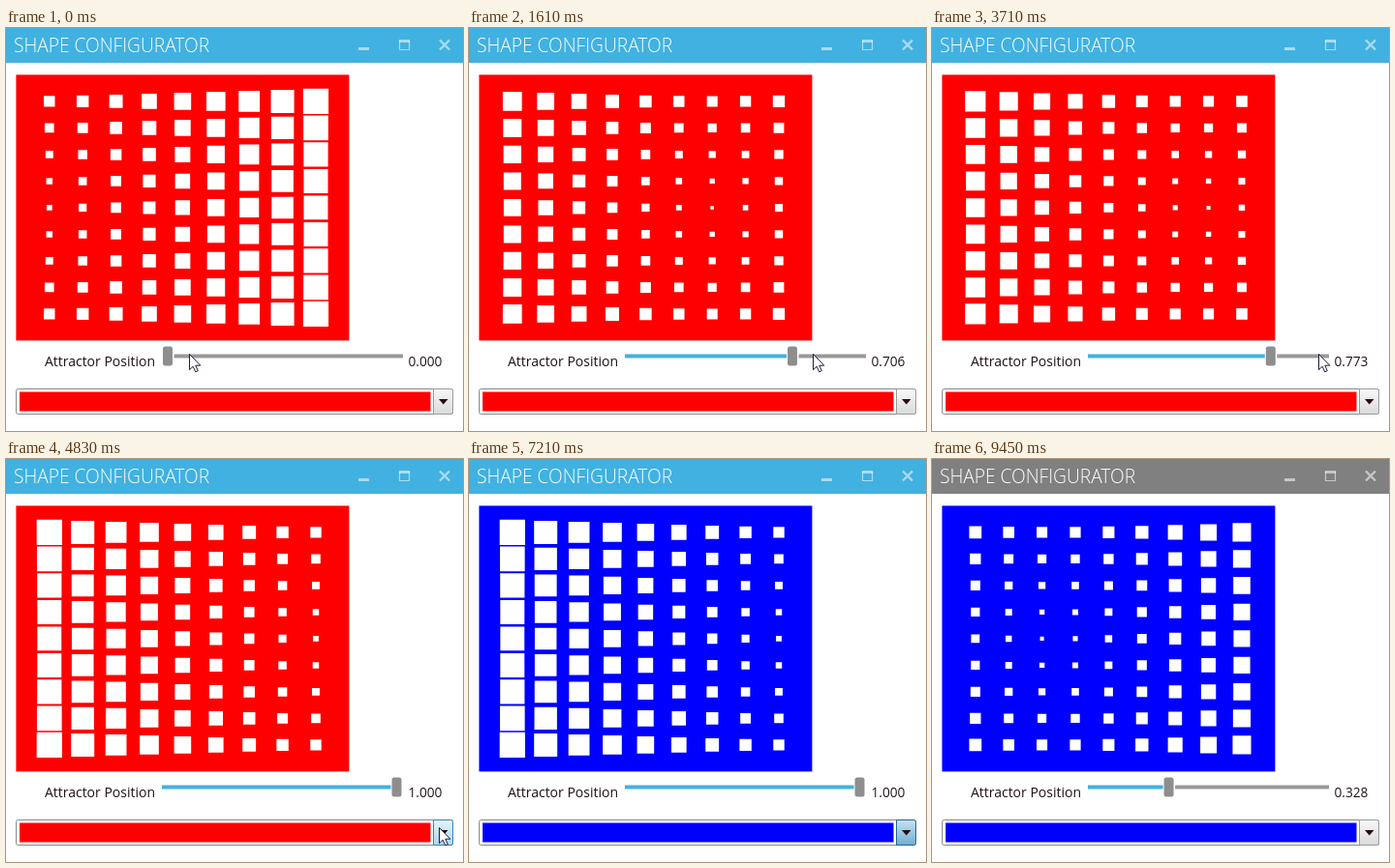
These frames come from a looping animation (472 by 417 pixels, 9.52 s). An HTML page:

```html
<!DOCTYPE html>
<html lang="en">
<head>
<meta charset="utf-8">
<title>Shape configurator</title>
<style>
html, body { margin: 0; width: 100%; height: 100%; overflow: hidden; background: #fff; }
svg { display: block; width: 472px; height: 417px; }
text { font-family: "Open Sans", "Noto Sans", sans-serif; font-size: 14px; fill: #201216; }
#title { font-size: 19.2px; font-weight: 350; fill: #fff; }
#value { font-size: 13.7px; }
#bar { fill: #41b1e1; animation: blur 9520ms step-end infinite; }
@keyframes blur { 99.26% { fill: #808080; } }
</style>
</head>
<body>
<svg viewBox="0 0 472 417">
  <defs>
    <linearGradient id="normal" x2="0" y2="1"><stop stop-color="#f8f8f8"/><stop offset="1" stop-color="#dadada"/></linearGradient>
    <linearGradient id="hover" x2="0" y2="1"><stop stop-color="#e6f4fc"/><stop offset="1" stop-color="#a9d9f2"/></linearGradient>
    <linearGradient id="open" x2="0" y2="1"><stop stop-color="#c4e2f2"/><stop offset="1" stop-color="#70aed3"/></linearGradient>
  </defs>
  <rect id="bar" width="472" height="36"/>
  <text id="title" x="8" y="25">SHAPE CONFIGURATOR</text>
  <g fill="none" stroke="#fff" stroke-opacity=".55">
    <path d="M364 21.5h11" stroke-width="3"/>
    <path d="M406.5 13v9.5h10V13" stroke-width="1.2"/>
    <path d="M406 13.5h11" stroke-width="3"/>
    <path d="M448 12.5l10 10m0-10l-10 10" stroke-width="2.4"/>
  </g>
  <rect id="panel" x="10.4" y="48.4" width="344" height="275"/>
  <path id="cells" fill="#fff"/>
  <text x="40" y="350">Attractor Position</text>
  <text id="value" x="415.5" y="350">0.000</text>
  <rect id="done" x="161" y="337.5" height="4" fill="#41b1e1"/>
  <rect id="rest" y="337.5" height="4" fill="#999"/>
  <rect id="thumb" y="329.5" width="10" height="20" rx="2.5"/>
  <rect x="10.5" y="373.5" width="451" height="26" rx="2" fill="#fff" stroke="#8a8a8a"/>
  <rect id="swatch" x="14" y="376.5" width="424.5" height="20"/>
  <path id="button" d="M441.5 373.5h18q2 0 2 2v22q0 2-2 2h-18z"/>
  <path d="M447 384h9.5l-4.75 5.5z" fill="#2a0a10"/>
  <path id="cursor" d="M-.5 -.5v16.2l3.7-3.5 2.5 5.6 2.6-1.1-2.5-5.5h5z" fill="#fff" stroke="#1c1c38"/>
</svg>
<script>
const LOOP = 9520, STEP = 70, LEAD = 130;
const el = id => document.getElementById(id);
const set = (id, attrs) => {
  for (const k in attrs) el(id).setAttribute(k, attrs[k]);
};
const within = (t, a, b) => t >= a && t < b;
const mix = (a, b, p) => a + (b - a) * p;
const last = (list, t) => list.filter(m => m.start <= t).pop() || list[0];
const progress = (m, t) => Math.min(1, Math.max(0, (t - m.start) / (m.end - m.start)));

const drags = [
  { start: 630, end: 2030, from: 0, to: 1, power: .976 },
  { start: 2100, end: 3080, from: 1, to: .086, power: 1 },
  { start: 3080, end: 3850, from: .086, to: 1, power: 1.423 },
  { start: 7980, end: 8750, from: 1, to: .328, power: .85 }
];

const moves = [
  { start: 0, end: 350, from: [190, 338], to: [167, 342] },
  { start: 3850, end: 4900, from: [406, 334], to: [441, 382], bow: 35 },
  { start: 4900, end: 5040, from: [441, 382], to: [330, 404] },
  { start: 5670, end: 6060, from: [347, 405], to: [441, 386] },
  { start: 6370, end: 6510, from: [441, 386], to: [430, 410] },
  { start: 7420, end: 7980, from: [440, 406], to: [404, 338] },
  { start: 8750, end: 8890, from: [244, 338], to: [244, 338] },
  { start: 8890, end: 9310, from: [244, 338], to: [445, 408] }
];

function slider(t) {
  const d = last(drags, t);
  return mix(d.from, d.to, progress(d, t) ** d.power);
}

// the thumb trails behind the pointer while dragged
function pointer(t) {
  if (within(t, 630, 3850) || within(t, 7980, 8750)) return [167 + 236.5 * slider(t + LEAD), 338];
  const m = last(moves, t), p = progress(m, t), e = 1 - (1 - p) ** 2;
  return [mix(m.from[0], m.to[0], e) + (m.bow || 0) * Math.sin(Math.PI * p), mix(m.from[1], m.to[1], e)];
}

// squares grow with their distance from the attractor
function grid(v) {
  let d = "";
  for (let r = 1; r < 10; r++) {
    for (let c = 1; c < 10; c++) {
      const dx = 34.4 * c - 344 * v, dy = 27.5 * (r - 5);
      const s = 3.4 + .0695 * Math.hypot(dx, dy);
      d += `M${10.4 + 34.4 * c - s / 2} ${48.4 + 27.5 * r - s / 2}h${s}v${s}h${-s}z`;
    }
  }
  return d;
}

function draw(t) {
  const v = slider(t), left = 162 + 236.5 * v;
  const fill = t < 5460 ? "#f00" : t < 7210 ? "#8b008b" : "#00f";
  set("panel", { fill });
  set("swatch", { fill });
  set("cells", { d: grid(v) });
  el("value").textContent = v.toFixed(3);

  const over = within(t, 350, 490) || within(t, 8750, 8890);
  set("thumb", { x: left, fill: over ? "#757575" : "#8e8e8e" });
  set("done", { width: left - 162 });
  set("rest", { x: left + 11.5, width: 398.5 - left });

  const shown = t < 5040 || within(t, 5670, 6510) || within(t, 7420, 9310);
  const [x, y] = pointer(t).map(Math.round);
  set("cursor", { visibility: shown ? "visible" : "hidden", transform: `translate(${x} ${y})` });

  const open = within(t, 4900, 5530) || within(t, 6370, 7280);
  const hover = shown && x < 462 && within(y, 373, 400);
  const state = open ? "open" : hover ? "hover" : "normal";
  const stroke = { open: "#2c628b", hover: "#3c7fb1", normal: "#9a9a9a" }[state];
  set("button", { fill: `url(#${state})`, stroke });
}

function tick() {
  const t = performance.now() - start;
  draw(Math.floor(t % LOOP / STEP) * STEP);
  requestAnimationFrame(tick);
}
const start = performance.now();
tick();
</script>
</body>
</html>
```
